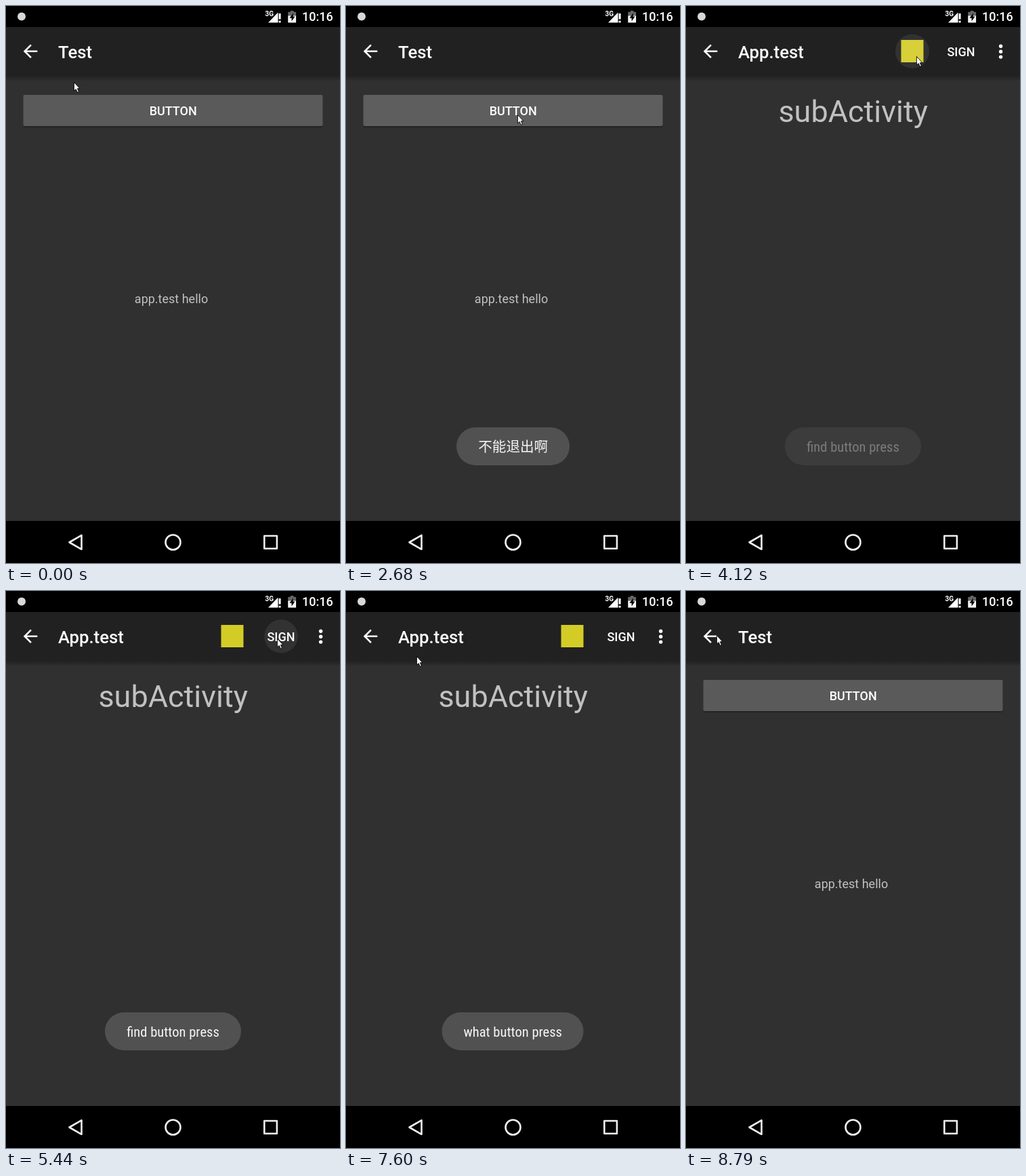
Write an HTML page that moves like this. It is 493 px wide and 821 px high and loops after 9150 ms.

```html
<!DOCTYPE html>
<html lang="en">
<head>
<meta charset="utf-8">
<title>App bar demo</title>
<style>
  html, body { margin: 0; width: 100%; height: 100%; overflow: hidden; background: #000; }
  svg { display: block; width: 100%; height: 100%; }
  text { font-family: Roboto, "Noto Sans", sans-serif; fill: #fff; white-space: pre; }
  .medium { font-weight: 500; }
  .mid { text-anchor: middle; }
  .toast text { font-size: 20.57px; text-anchor: middle; fill: #f6f6f6; }
  .narrow { font-family: "Roboto Condensed", Roboto, sans-serif; font-stretch: 75%; }
  .cjk { font-family: "Noto Sans CJK SC", "Noto Sans CJK", sans-serif; }
</style>
</head>
<body>
<svg viewBox="0 0 493 821" preserveAspectRatio="none">
  <defs>
    <linearGradient id="shade" x2="0" y2="1">
      <stop offset="0" stop-opacity=".32"/>
      <stop offset="1" stop-opacity="0"/>
    </linearGradient>
    <filter id="soft" x="-10%" y="-20%" width="120%" height="150%">
      <feDropShadow dx="0" dy="4" stdDeviation="4" flood-opacity=".45"/>
    </filter>
    <g id="window">
      <rect width="493" height="821"/>
      <rect y="31" width="493" height="728" fill="#303030"/>
      <rect y="31" width="493" height="72" fill="#212121"/>
      <rect y="103" width="493" height="8" fill="url(#shade)"/>
      <path transform="translate(20.6 51.4) scale(1.286)" fill="#fff"
        d="M20 11H7.83l5.59-5.59L12 4l-8 8 8 8 1.41-1.41L7.83 13H20z"/>
    </g>
  </defs>

  <g id="main">
    <use href="#window"/>
    <text class="medium" x="77" y="77" font-size="25.7">Test</text>
    <rect x="25.5" y="132" width="442" height="47" rx="2.5" opacity=".25"/>
    <rect x="25.5" y="131" width="442" height="46" rx="2" fill="#5a5a5b"/>
    <rect id="press" x="25.5" y="131" width="442" height="46" rx="2" fill="#fff"/>
    <text class="medium mid" x="246.7" y="161" font-size="18">BUTTON</text>
    <text class="mid" x="244" y="438" font-size="18" style="fill:#c1c1c1">app.test hello</text>
  </g>

  <g id="sub">
    <use href="#window"/>
    <text class="medium" x="77" y="77" font-size="25.7">App.test</text>
    <rect x="317.5" y="50" width="33" height="33" fill="#d3cc27"/>
    <text class="medium mid" x="406" y="74" font-size="18">SIGN</text>
    <g fill="#fff">
      <circle cx="464.6" cy="59.3" r="2.7"/>
      <circle cx="464.6" cy="67.2" r="2.7"/>
      <circle cx="464.6" cy="75.1" r="2.7"/>
    </g>
    <text class="mid" x="246.7" y="171" font-size="45" style="fill:#c1c1c1">subActivity</text>
  </g>

  <circle id="ripple" cy="66.7" fill="#fff"/>

  <g id="status">
    <circle cx="23" cy="15.5" r="6" fill="#d8d8d8"/>
    <text x="382.5" y="14.5" font-size="10" font-weight="700">3G</text>
    <path d="M387 24.5L401.5 9.5V24.5Z" fill="#fff"/>
    <path d="M402.6 11h3v8.5h-3zM402.6 21.7h3v2.8h-3z" fill="#fff"/>
    <path d="M416.3 15V8.7h3.6V7h4.6v1.7h3.6V15z" fill="#666"/>
    <path d="M416.3 14.5h11.8v10h-11.8z" fill="#fff"/>
    <path d="M424 10.5l-5.6 7.3h3.2v4.7l5-7h-3z"/>
    <text class="medium" x="437" y="22.3" font-size="18">10:16</text>
  </g>

  <g fill="none" stroke="#eee" stroke-width="2.6" stroke-linejoin="round">
    <path d="M93.5 790.5L111.5 780.2V800.8Z"/>
    <circle cx="246.5" cy="790.5" r="11"/>
    <rect x="381.3" y="781" width="18.6" height="18.8"/>
  </g>

  <g class="toast" id="quit">
    <rect x="163" y="621" width="167" height="56" rx="28" fill="#515151"/>
    <text class="cjk" x="246.7" y="657">不能退出啊</text>
  </g>
  <g class="toast" id="find">
    <rect x="146" y="621" width="201" height="56" rx="28" fill="#515151"/>
    <text class="narrow" x="246.5" y="656.5">find button press</text>
  </g>
  <g class="toast" id="what">
    <rect x="141.5" y="621" width="209" height="56" rx="28" fill="#515151"/>
    <text class="narrow" x="246.2" y="656.5">what button press</text>
  </g>

  <g id="menu">
    <rect x="235.7" y="36" width="252.6" height="123" rx="2" fill="#303030" filter="url(#soft)"/>
    <text x="257" y="74.6" font-size="20.57">title</text>
    <text x="257" y="136.2" font-size="20.57">hellpo</text>
  </g>

  <path id="cursor" fill="#fff" stroke="#000" stroke-width=".9"
    d="M.4 .4V13L3.2 10.6 5.4 15.3 7.5 14.4 5.4 9.7H9Z"/>
</svg>
<script>
const LOOP = 9150;
const el = Object.fromEntries(
  [...document.querySelectorAll('svg > [id], #press')].map(n => [n.id, n]));

const ramp = (t, a, b) => Math.min(1, Math.max(0, (t - a) / (b - a)));
const smooth = p => p * p * (3 - 2 * p);
const fade = (t, inA, inB, outA, outB) => ramp(t, inA, inB) * (1 - ramp(t, outA, outB));

// time, x, y of the pointer tip
const path = [
  [40, 100, 112], [340, 37, 62],
  [850, 37, 62], [1480, 253, 160],
  [3260, 253, 160], [3520, 390, 92], [3720, 340, 74],
  [4350, 340, 74], [4710, 400, 69],
  [5800, 400, 70], [6180, 471, 79],
  [6620, 470, 79], [6920, 410, 250],
  [7200, 410, 250], [7600, 104, 96], [7840, 45, 65]
];

// centre x, radius, start, growth time, fade start, fade end
const ripples = [
  [36, 25, 610, 120, 720, 960],
  [334, 25, 4030, 80, 4260, 4480],
  [406, 24.7, 5440, 0, 5640, 5880],
  [464.6, 25, 6340, 120, 6580, 6740],
  [38.5, 17.5, 8200, 0, 8410, 8410]
];

function pointer(t) {
  const i = path.findIndex(p => p[0] > t);
  if (i === 0) return path[0].slice(1);
  if (i < 0) return path[path.length - 1].slice(1);
  const [a, x0, y0] = path[i - 1], [b, x1, y1] = path[i];
  const p = smooth(ramp(t, a, b));
  return [x0 + (x1 - x0) * p, y0 + (y1 - y0) * p];
}

function show(node, alpha) {
  node.setAttribute('opacity', alpha);
  node.setAttribute('visibility', alpha > 0 ? 'visible' : 'hidden');
}

function move(node, x, y, extra = '') {
  node.setAttribute('transform', `translate(${x} ${y}) ${extra}`);
}

function drawRipple(t) {
  const hit = ripples.find(r => t >= r[2] && t < r[5]);
  show(el.ripple, hit ? 0.08 * (1 - ramp(t, hit[4], hit[5])) : 0);
  if (!hit) return;
  const [x, r, start, grow] = hit;
  el.ripple.setAttribute('cx', x);
  el.ripple.setAttribute('r', grow ? r * (0.5 + 0.5 * ramp(t, start, start + grow)) : r);
}

function drawScreens(t) {
  const open = ramp(t, 2780, 2980), close = ramp(t, 8610, 8790);
  show(el.sub, open * (1 - close));
  move(el.sub, 0, 66 * ((1 - open) ** 3 + close ** 3));
  show(el.press, 0.025 * fade(t, 2210, 2460, 2980, 3000));
}

function drawMenu(t) {
  const p = smooth(ramp(t, 6340, 6500)), s = 0.6 + 0.4 * p;
  show(el.menu, p * (1 - ramp(t, 7120, 7260)));
  move(el.menu, 488 * (1 - s), 36 * (1 - s), `scale(${s})`);
}

function draw(t) {
  drawScreens(t);
  drawRipple(t);
  drawMenu(t);
  show(el.quit, fade(t, 640, 840, 3340, 3720));
  show(el.find, fade(t, 4060, 4220, 5640, 5840));
  show(el.what, fade(t, 5740, 5960, 7660, 7990));
  move(el.cursor, ...pointer(t));
}

// Where no condensed face is installed, narrow the regular one.
document.querySelectorAll('.narrow').forEach(n => {
  if (n.getComputedTextLength() > 150) {
    const x = n.getAttribute('x');
    n.setAttribute('transform', `translate(${x} 0) scale(.865 1) translate(${-x} 0)`);
  }
});

const began = performance.now();
function tick() {
  draw((performance.now() - began) % LOOP);
  requestAnimationFrame(tick);
}
tick();
</script>
</body>
</html>
```
